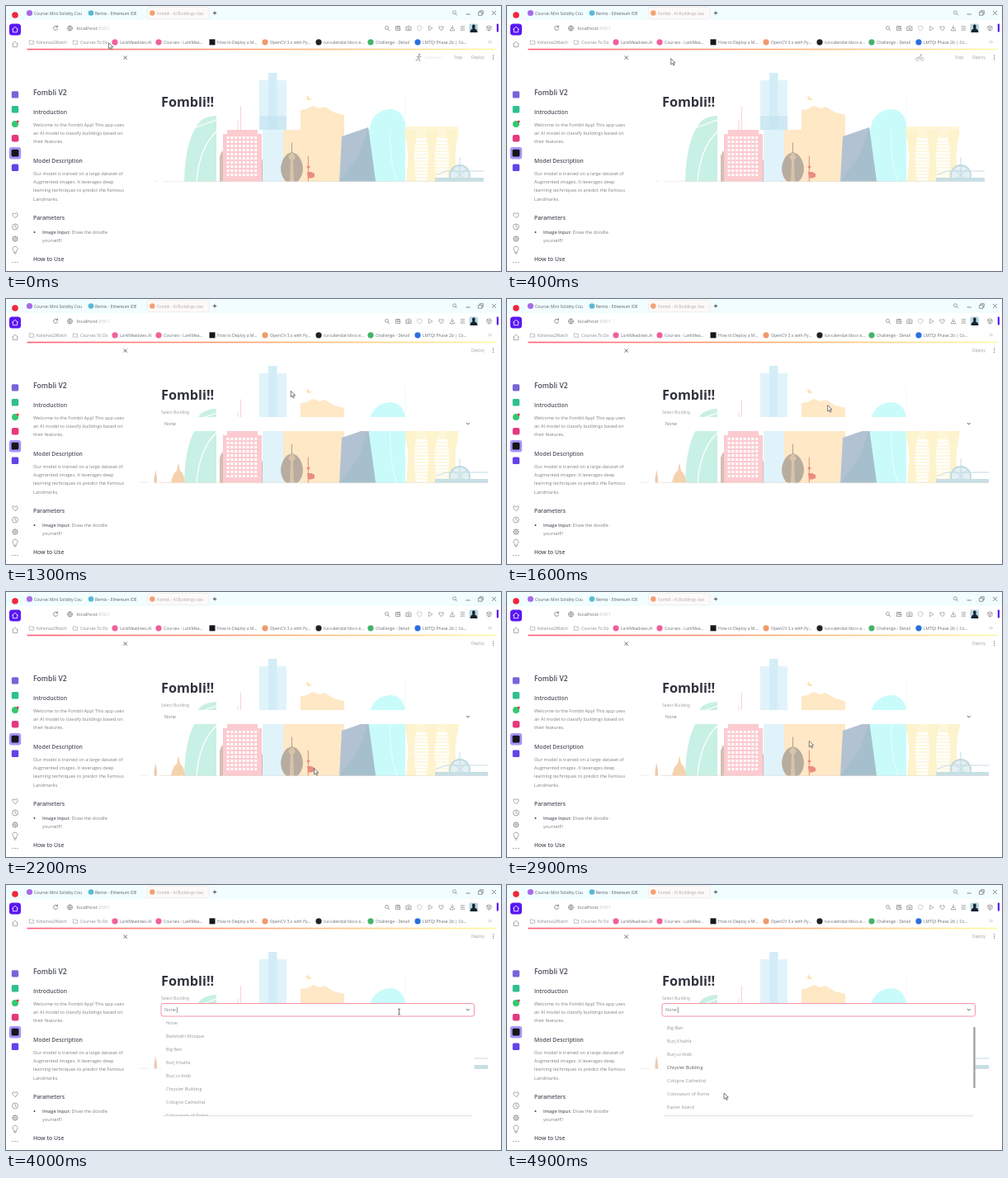
Write an HTML page that moves like this. It is 600 px wide and 321 px high and loops after 5000 ms.

```html
<!DOCTYPE html>
<html lang="en">
<head>
<meta charset="utf-8">
<title>Fombli V2</title>
<style>
html, body { margin: 0; width: 100%; height: 100%; overflow: hidden; background: #fff; }
svg { display: block; width: 100vw; height: 100vh; font-family: "Open Sans", "Noto Sans", sans-serif; }
text { white-space: pre; }
</style>
</head>
<body>
<svg id="stage" viewBox="0 0 600 321" preserveAspectRatio="none"></svg>
<script>
const LOOP = 5000, STEP = 100;
const LOADED = 1200, OPENED = 4000, SCROLLED = 4900;

const text = (x, y, size, str, fill = '#7a7f89', weight = 400) =>
  `<text x="${x}" y="${y}" font-size="${size}" fill="${fill}" font-weight="${weight}">${str}</text>`;
const rect = (x, y, w, h, fill, r = 0, more = '') =>
  `<rect x="${x}" y="${y}" width="${w}" height="${h}" fill="${fill}" rx="${r}" ${more}/>`;
const dot = (x, y, r, fill) => `<circle cx="${x}" cy="${y}" r="${r}" fill="${fill}"/>`;
const shape = (d, fill) => `<path d="${d}" fill="${fill}"/>`;
const line = (d, color = '#808080', w = 0.7) =>
  `<path d="${d}" fill="none" stroke="${color}" stroke-width="${w}" stroke-linecap="round" stroke-linejoin="round"/>`;
const ring = (x, y, r, color = '#808080', w = 0.7) =>
  `<circle cx="${x}" cy="${y}" r="${r}" fill="none" stroke="${color}" stroke-width="${w}"/>`;
const heart = (x, y, s) =>
  line(`M${x} ${y + s}l${-s} ${-s}q${-s * .3} ${-s} ${s * .5} ${-s}l${s * .5} ${s * .5}l${s * .5} ${-s * .5}q${s * .8} 0 ${s * .5} ${s}z`);
const house = (x, y, color) =>
  line(`M${x - 3.4} ${y - .3}L${x} ${y - 3.3}L${x + 3.4} ${y - .3}M${x - 2.6} ${y - .8}v4h5.2v-4`, color, 0.8);
const lens = (x, y) => ring(x - .5, y - .6, 2) + line(`M${x + 1} ${y + 1}l1.7 1.7`);

function tabs() {
  return rect(0, 0, 600, 17, '#f2fdff') + rect(22, 17, 578, 304, '#fff', 3) +
    rect(171.5, 1.5, 74.5, 14, '#fcfaf9', 2.5, 'stroke="#f3e4e1" stroke-width=".6"') +
    dot(28.5, 8.5, 3.6, '#a66be8') + text(34, 10.5, 5, 'Course: Mini Solidity Cou', '#5b6069') +
    dot(103, 8.5, 3.3, '#58b9d4') + text(108, 10.5, 5, 'Remix - Ethereum IDE', '#5b6069') +
    dot(177.3, 8.5, 3.2, '#f2a173') + text(183, 10.5, 4.9, 'Fombli - AI Buildings clas', '#b5a3a2') +
    line('M251.2 8.5h3.6M253 6.7v3.6', '#444', 0.9) +
    lens(544, 8.4) + line('M558 10h4.4', '#555') +
    line('M573 7.3h4v4h-4zM574.3 7v-1.3h4v4h-1', '#555', 0.6) +
    line('M589.3 6.2l4.4 4.4m0-4.4l-4.4 4.4', '#555');
}

function toolbar() {
  const y = 27;
  return line('M62.3 25.2a2.6 2.6 0 1 0 .4 2.4M62.5 23.8v1.8h-1.8', '#666') +
    ring(77.5, y, 3, '#666', 0.6) + line('M74.5 27h6M77.5 24q-2.4 3 0 6q2.4-3 0-6', '#666', 0.5) +
    text(85.5, 29, 6, 'localhost<tspan fill="#c6c8cd">:8501</tspan>', '#6a6e77') +
    lens(462, y) +
    line('M477.5 24.5h-5v5h5.2v-2M474.5 27.5h3v-1.8h-3z') +
    line('M485.2 25.2h1.3l.8-1h1.6l.8 1h1.3v4.4h-5.8z') + ring(488, 27.3, 1.1) +
    line('M501.3 24.1l2.6 1v2.4q-.6 1.7-2.6 2.5q-2-.8-2.6-2.5v-2.4z', '#bbb') +
    line('M512.8 24.4l4.2 2.6l-4.2 2.6z', '#999') + heart(527.5, 27, 2.5) +
    line('M541 24v3.6m-1.6-1.5l1.6 1.6l1.6-1.6M538.5 28.4v1.4h5v-1.4') +
    line('M551.2 24.8h4.5M551.2 27h4.5M551.2 29.2h2.5M554.7 29.2h1') +
    rect(561.5, 21.5, 10.5, 10.5, '#b8d7e3', 2) +
    shape('M562.5 32q.5-4 3-4.4q-1.3-5 1.3-5q2.8 0 1.4 5q2.8.4 3.3 4.4z', '#14232e') +
    line('M585.5 24l2.5 1.3v3.2l-2.5 1.4l-2.5-1.4v-3.2zM583 25.3l2.5 1.3l2.5-1.3M585.5 26.6v3.2') +
    rect(594.8, 21.5, 2.2, 10, '#5a17f5', 0.8);
}

function bookmarks() {
  const folder = x => line(`M${x - 2.7} 45.8v-4.1h2l.8.8h2.6v3.3z`, '#999', 0.6);
  const marks = [
    [132, '#f0609b', 138, 'LarkMeadows.AI'], [185, '#f0609b', 191, 'Courses - LarkMea...'],
    [250, '', 256, 'How to Deploy a M...'], [314, '#ef9a6c', 320, 'OpenCV 3.x with Py...'],
    [379, '#222', 385, 'tui-calendar/docs e...'], [442, '#45b36b', 448, 'Challenge - Detail'],
    [499, '#2a6fe0', 505, 'LMTQI Phase 2b | Co...']];
  return folder(31) + text(37, 45.6, 4.85, 'Kdramas2Watch', '#858991') +
    folder(84) + text(90, 45.6, 5, 'Courses To Do', '#858991') +
    marks.map(([x, c, tx, s]) =>
      (c ? dot(x, 43.8, 3.6, c) : rect(x - 3.5, 40.3, 7, 7, '#17181c')) + text(tx, 45.6, 5.05, s, '#6b7078')).join('') +
    line('M585 42.2l1.3 1.3l-1.3 1.3M587.2 42.2l1.3 1.3l-1.3 1.3', '#999', 0.6) +
    rect(25.5, 51.7, 569, 1.6, 'url(#deco)');
}

function rail() {
  let gear = '';
  for (let a = 0; a < 8; a++) {
    const c = Math.cos(a * Math.PI / 4), s = Math.sin(a * Math.PI / 4);
    gear += line(`M${11 + c * 2.7} ${282 + s * 2.7}L${11 + c * 3.6} ${282 + s * 3.6}`);
  }
  return dot(11, 11, 3.8, '#f0263c') +
    rect(4, 21.5, 14, 14, '#5a17f5', 3.5) + house(11, 28.5, '#fff') + house(11, 46.3, '#999') +
    rect(6.8, 103.2, 8.4, 8.4, '#7a63d9', 1.5) +
    rect(6.8, 121, 8.4, 8.4, '#2fc08e', 1.5) +
    dot(11, 143, 4, '#35c872') + dot(14.2, 140, 1.5, '#e8384f') +
    rect(6.8, 156, 8.6, 8.6, '#e5397f', 2.4) +
    rect(3.8, 171, 14.4, 14.4, '#a894fb', 3) + rect(6.6, 173.8, 8.8, 8.8, '#15161a', 1.5) +
    rect(6.8, 191.6, 8.4, 8.4, '#6443e8', 1.5) +
    heart(11, 253.6, 3) + ring(11, 267.5, 3.5) + line('M11 265.5v2.2l1.5.8') +
    ring(11, 282, 2.7) + ring(11, 282, 1) + gear +
    line('M9.6 298.2v-1.4a3 3 0 1 1 2.8 0v1.4zM10 300h2') +
    [8, 11, 14].map(x => dot(x, 310.5, 0.6, '#555')).join('');
}

function notes() {
  const head = (y, s) => text(33, y, 6.8, s, '#50545f', 600);
  const body = (x, y, rows) => rows.map((s, i) => text(x, y + i * 10.2, 5.6, s)).join('');
  return line('M142.8 60.8l3.6 3.6m0-3.6l-3.6 3.6', '#444', 0.8) +
    text(33, 108, 8.6, 'Fombli V2', '#464a55', 600) +
    head(130.8, 'Introduction') +
    body(33, 146, ['Welcome to the Fombli App! This app uses', 'an AI model to classify buildings based on', 'their features.']) +
    head(189.8, 'Model Description') +
    body(33, 205, ['Our model is trained on a large dataset of', 'Augmented images. It leverages deep', 'learning techniques to predict the Famous', 'Landmarks.']) +
    head(259, 'Parameters') + dot(34.5, 274, 1, '#444') +
    body(44, 276, ['<tspan font-weight="600" fill="#5a5e68">Image Input</tspan>: Draw the doodle', 'yourself!!']) +
    head(309, 'How to Use');
}

function skyline() {
  let s = '';
  // rounded green tower
  s += shape('M216 213Q217 158 237 138Q246 133 255 133V213z', '#c9f0e4') +
    line('M231 213Q234 172 255 152M222 150L255 138', '#fff', 1.2);
  // pink block with windows
  s += shape('M259 213V182L262 175L265 182V213zM309 213V190L313 180L317 190V213z', '#d2bfb4') +
    shape('M263 213V155H268V150H305V155H310V213z', '#fccbd0');
  for (let y = 158; y < 208; y += 5)
    for (let x = 267.5; x < 304; x += 4.8) s += rect(x, y, 3, 3, '#fff');
  s += line('M284.5 122V150M281 138V150', '#f6c9c6', 0.8);
  // blue tower
  s += rect(307, 90, 33, 60, '#e0f3fb') + rect(311, 150, 25, 63, '#e0f3fb') + rect(318, 81, 10.5, 69, '#d3edf7');
  // tan block and moon
  s += shape('M336 213V150H357V126L364 125L372 121L380 124L386 122L398 129L410 132V213z', '#fee8c6') +
    shape('M366 108.5Q366 112 371 112.5Q366 116 364.5 112.5Q363.5 110 366 108.5z', '#fde3b0');
  // egg dome with a needle tower before it
  s += shape('M340 213Q333 207 333 196Q335 180 346.5 177Q358 180 360 196Q360 207 353 213z', '#b7ac9f') +
    line('M346.5 166V178', '#a39b92', 0.9) + shape('M345.5 178h2l3.5 5l-3 4l1 26h-5l1-26l-3-4z', '#d8c4a8');
  // small red tower
  s += line('M366.3 182V213', '#e9897c', 1) + dot(366.5, 195, 1.8, '#ea8d80') +
    shape('M365 201h5l4 2v4l-4 1.5h-4z', '#ea8d80');
  // teal arch
  s += shape('M425 213L443 139Q452 124 468 125Q481 127 484 143V213z', '#c9fbfb') +
    line('M484 106V143', '#e0f8f5', 0.6) + line('M474 213Q464 186 466 150', '#e6fdfd', 1.2);
  // slate wedge
  s += shape('M404 213L407 158L439 147L448 213z', '#b3c2d2') + shape('M404 213L428 180L439 147L448 213z', '#a6bfcc');
  // yellow flared columns joined by thin floors
  s += rect(484, 146, 64, 14, '#fef6d8');
  for (let y = 163; y < 213; y += 4) s += rect(488, y, 57, 2, '#fef8e0');
  s += [491, 516, 541].map(x =>
    shape(`M${x - 8} 150H${x + 8}Q${x + 4} 170 ${x + 3.5} 185L${x + 6} 213H${x - 6}L${x - 3.5} 185Q${x - 4} 170 ${x - 8} 150z`, '#fdf3cd')).join('');
  // bridge wheel
  s += dot(550, 205, 12, '#e3eff2') + ring(550, 205, 12, '#bdd8e0', 1.8) +
    line('M522 204L534 200H584M550 184V213M540 196L560 213M560 196L540 213', '#bdd8e0', 0.9) +
    rect(520, 208, 64, 5, '#c6dfe5');
  return s + line('M180 212.4h4M190 212.4H584', '#e6dfd9', 0.6);
}

function domes() {
  return shape('M200 222.5Q202 211 207 208L209 198L211 208Q216 211 217 222.5z', '#f5d2ae') +
    shape('M179.5 222.5V217L181.2 207L183 217V222.5z', '#edcbb0') +
    line('M162 222.2h10M186 222.2h14', '#e6dfd9', 0.6);
}

function status() {
  const runner = dot(501, 58.7, 1, '#888') + line('M500.5 60.4l-.8 2.8l1.8 1.4l-.5 2.4M499.7 63.2l-.8 2l-2 .5M498 61.8l2.2-1.2l1.5 1.4l1.4-.4', '#888', 0.8) +
    text(508, 64, 4.3, 'RUNNING...', '#dfe1e5');
  const rider = ring(497.3, 64.3, 2, '#aaa', 0.6) + ring(503.3, 64.3, 2, '#aaa', 0.6) + dot(502, 59, 0.9, '#aaa') +
    line('M497.3 64.3l2-2.7l2.5-1.2l1.5 3.9M499.3 61.6l1.6 2.5', '#aaa', 0.7);
  return `<g id="busy"><g id="runner">${runner}</g><g id="rider">${rider}</g>${text(543, 64, 4.9, 'Stop', '#9a9ea6')}</g>` +
    text(564, 64, 4.9, 'Deploy', '#9a9ea6') + [59.8, 62.2, 64.6].map(y => dot(590.7, y, 0.6, '#555')).join('');
}

const places = ['None', 'Badshahi Mosque', 'Big Ben', 'Burj Khalifa', 'Burj ul Arab', 'Chrysler Building',
  'Cologne Cathedral', 'Colosseum of Rome', 'Easter Island'];

function picker() {
  return `<g id="picker">${text(188, 138.6, 5, 'Select Building', '#9a9da5')}
    <rect id="field" x="188" y="143.5" width="379.5" height="15.5" rx="2.5" fill="#fff" stroke-width="0.9"/>
    ${text(192, 153.4, 5.5, 'None')}${line('M558.2 150.3l1.6 1.6l1.6-1.6', '#444', 0.9)}
    <g id="menu">${rect(187.5, 160, 380, 120, '#fff')}${rect(190, 279.3, 375, 0.8, '#d5d6da')}
      ${line('M207.4 148.3v6.4', '#555', 0.6)}
      <g clip-path="url(#list)"><g id="items">
        ${places.map((s, i) => text(194, 169 + i * 16, 5.5, s)).join('')}</g></g>
      <g id="bar">${rect(565.4, 172, 2.2, 74, '#9b9ca0', 0.8)}</g></g></g>`;
}

const box = (id, x, y, w, h) => `<clipPath id="${id}"><rect x="${x}" y="${y}" width="${w}" height="${h}"/></clipPath>`;
const $ = id => document.getElementById(id);

$('stage').innerHTML = `<defs>
  <linearGradient id="deco"><stop stop-color="#ff5c78"/><stop offset=".5" stop-color="#ffa875"/><stop offset="1" stop-color="#fff9a0"/></linearGradient>
  ${box('whole', 179, 80, 400, 133)}${box('top', 179, 80, 305.5, 63)}${box('low', 158, 160, 430, 63)}${box('list', 188, 165, 379, 114.5)}
  <g id="city">${skyline()}</g></defs>
  ${tabs()}${toolbar()}${bookmarks()}${rail()}${notes()}
  <g id="early" clip-path="url(#whole)"><use href="#city"/>${rect(307, 133, 33, 17, '#b9dcec', 0, 'opacity=".45"')}</g>
  <g id="late"><g clip-path="url(#top)"><use href="#city"/></g>
    <g clip-path="url(#low)"><use href="#city" y="10"/>${domes()}</g></g>
  ${text(188, 121.5, 16.2, 'Fombli!!', '#31333f', 700)}
  ${status()}${picker()}
  <g id="mouse"><path id="arrow" d="M0 0v7.4l1.8-1.6l1.2 2.6l1.2-.5l-1.2-2.6h2.3z" fill="#fff" stroke="#444" stroke-width=".7"/>
    <path id="beam" d="M-1.5-3.3h3M0-3.3v6.6M-1.5 3.3h3" fill="none" stroke="#444" stroke-width=".7"/></g>`;

// time, x, y of the pointer
const path = [[0, 124.5, 44.5], [800, 273, 82.5], [1600, 388.7, 128.7], [2150, 374, 216], [2900, 366.3, 180.5],
  [3800, 476.5, 153.5], [4200, 476.5, 153.5], [4800, 263, 252], [5000, 263, 252]];

function pointer(t) {
  const i = path.findIndex((p, k) => k && t <= p[0]);
  const [a, b] = [path[i - 1], path[i]], k = (t - a[0]) / (b[0] - a[0]);
  return [a[1] + (b[1] - a[1]) * k, a[2] + (b[2] - a[2]) * k];
}

const show = (id, on) => $(id).setAttribute('display', on ? 'inline' : 'none');
const rows = [...$('items').children];

function draw(now) {
  const t = Math.floor(now % LOOP / STEP) * STEP;
  const loaded = t >= LOADED, open = t >= OPENED, scrolled = t >= SCROLLED;
  const [x, y] = pointer(t);
  const typing = loaded && x > 188 && x < 568 && y > 143 && y < 160;
  show('early', !loaded);
  show('late', loaded);
  show('busy', !loaded);
  show('runner', t < 400);
  show('rider', t >= 400);
  show('picker', loaded);
  show('menu', open);
  show('bar', scrolled);
  show('arrow', !typing);
  show('beam', typing);
  $('field').setAttribute('stroke', open ? '#f58a9b' : 'none');
  $('items').setAttribute('transform', `translate(0 ${scrolled ? -26 : 0})`);
  const over = open ? Math.floor((y - 159) / 16) : -1;
  rows.forEach((r, i) => r.setAttribute('fill', i === over ? '#555963' : '#92969e'));
  $('mouse').setAttribute('transform', `translate(${x} ${y})`);
}

const start = performance.now();
function tick() {
  draw(performance.now() - start);
  requestAnimationFrame(tick);
}
tick();
</script>
</body>
</html>
```
